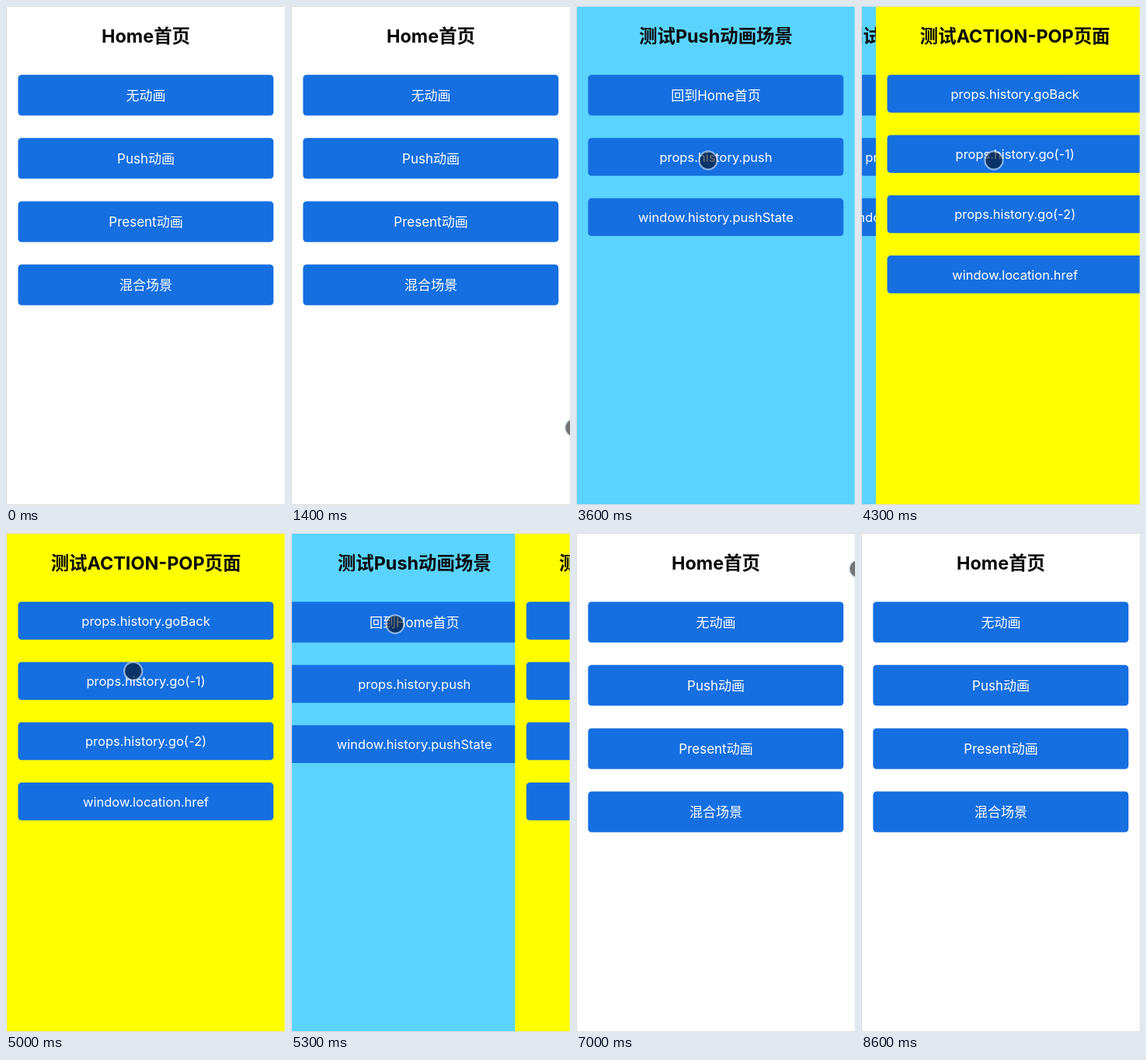
Animation, 359 px wide and 640 px high, one loop 8700 ms. Source, as an HTML page:

```html
<!DOCTYPE html>
<html lang="zh-CN">
<head>
<meta charset="utf-8">
<style>
  html, body { margin: 0; width: 100%; height: 100%; overflow: hidden; background: #fff; }
  svg { display: block; width: 359px; height: 640px; }
  text { font-family: Inter, "Noto Sans CJK SC", "Noto Sans CJK", sans-serif; text-anchor: middle; }
  .title { font-size: 23.4px; font-weight: 700; fill: #0a0a0a; }
  .label { fill: #fff; }
  .button { fill: #156fe1; }
</style>
</head>
<body>
<svg viewBox="0 0 359 640">
  <g id="pages"></g>
  <path d="M0 .5H359M0 639.5H359" stroke="#dedede"/>
  <path d="M.6 0V640" stroke="#dedede" stroke-width="1.2"/>
  <path d="M358.7 0V640" stroke="#e8e8e8" stroke-width=".6"/>
  <g id="cursor">
    <circle r="11" fill="#000" fill-opacity=".54"/>
    <circle r="11.6" fill="none" stroke="#d4e2ee" stroke-opacity=".6" stroke-width="2.2"/>
  </g>
</svg>
<script>
const LOOP = 8700, STEP = 100, SLIDE = 500, WIDTH = 358, PARALLAX = 0.3;

const pageData = [
  ['#fff', 'Home首页', ['无动画', 'Push动画', 'Present动画', '混合场景']],
  ['#5ad4ff', '测试Push动画场景', ['回到Home首页', 'props.history.push', 'window.history.pushState']],
  ['#ff0', '测试ACTION-POP页面', ['props.history.goBack', 'props.history.go(-1)', 'props.history.go(-2)', 'window.location.href']]
];

// Cursor path: time, x, y
const cursorPath = [
  [1300, 375, 560], [2000, 175, 215], [2600, 169, 203], [3600, 170, 198], [4300, 171, 198],
  [4900, 171, 192], [5250, 134, 117], [6250, 134, 117], [7000, 363, 46], [7200, 380, 40]
];

function add(parent, tag, attrs, text = '') {
  const node = document.createElementNS('http://www.w3.org/2000/svg', tag);
  for (const key in attrs) node.setAttribute(key, attrs[key]);
  node.textContent = text;
  return parent.appendChild(node);
}

function buildPage([color, title, labels]) {
  const page = add(document.getElementById('pages'), 'g', {});
  add(page, 'rect', { x: 1, width: WIDTH, height: 640, fill: color });
  add(page, 'text', { class: 'title', x: 180, y: 46.8 }, title);
  let y = 88.2;
  for (const label of labels) {
    const hasChinese = /[\u4e00-\u9fff]/.test(label);
    const height = hasChinese ? 52.3 : 48.5;
    add(page, 'rect', { class: 'button', x: 15.5, y, width: 328.7, height, rx: 4.5 });
    add(page, 'text', {
      class: 'label', x: 180, y: y + height / 2 + 6.4, 'font-size': hasChinese ? 17 : 16.5
    }, label);
    y += height + 28.8;
  }
  return page;
}

// CSS "ease": cubic-bezier(.25, .1, .25, 1)
function ease(x) {
  if (x <= 0) return 0;
  if (x >= 1) return 1;
  const bezier = (a, b, u) => 3 * a * u * (1 - u) ** 2 + 3 * b * u * u * (1 - u) + u ** 3;
  let low = 0, high = 1;
  for (let i = 0; i < 24; i++) {
    const mid = (low + high) / 2;
    if (bezier(0.25, 0.25, mid) < x) low = mid; else high = mid;
  }
  return bezier(0.1, 1, low);
}

const shown = (t, enter, leave) => ease((t - enter) / SLIDE) - ease((t - leave) / SLIDE);

function cursorAt(t) {
  const next = cursorPath.findIndex(point => point[0] > t);
  if (next < 1) return [-50, -50];
  const [t0, x0, y0] = cursorPath[next - 1], [t1, x1, y1] = cursorPath[next];
  const u = (t - t0) / (t1 - t0), k = u * u * (3 - 2 * u);
  return [x0 + (x1 - x0) * k, y0 + (y1 - y0) * k];
}

const pages = pageData.map(buildPage);
const cursor = document.getElementById('cursor');
const move = (node, x, y = 0) => node.setAttribute('transform', `translate(${x} ${y})`);

function render(now) {
  const t = Math.floor((now % LOOP) / STEP) * STEP;
  const push = shown(t, 2490, 5750), pop = shown(t, 3940, 5050);
  move(pages[0], -PARALLAX * WIDTH * push);
  move(pages[1], WIDTH * (1 - push) - PARALLAX * WIDTH * pop);
  move(pages[2], WIDTH * (1 - pop));
  pages[1].style.display = push > 0 ? '' : 'none';
  pages[2].style.display = pop > 0 ? '' : 'none';
  move(cursor, ...cursorAt(t));
}

let start;
function tick(now) {
  start ??= now;
  render(now - start);
  requestAnimationFrame(tick);
}
render(0);
requestAnimationFrame(tick);
</script>
</body>
</html>
```
